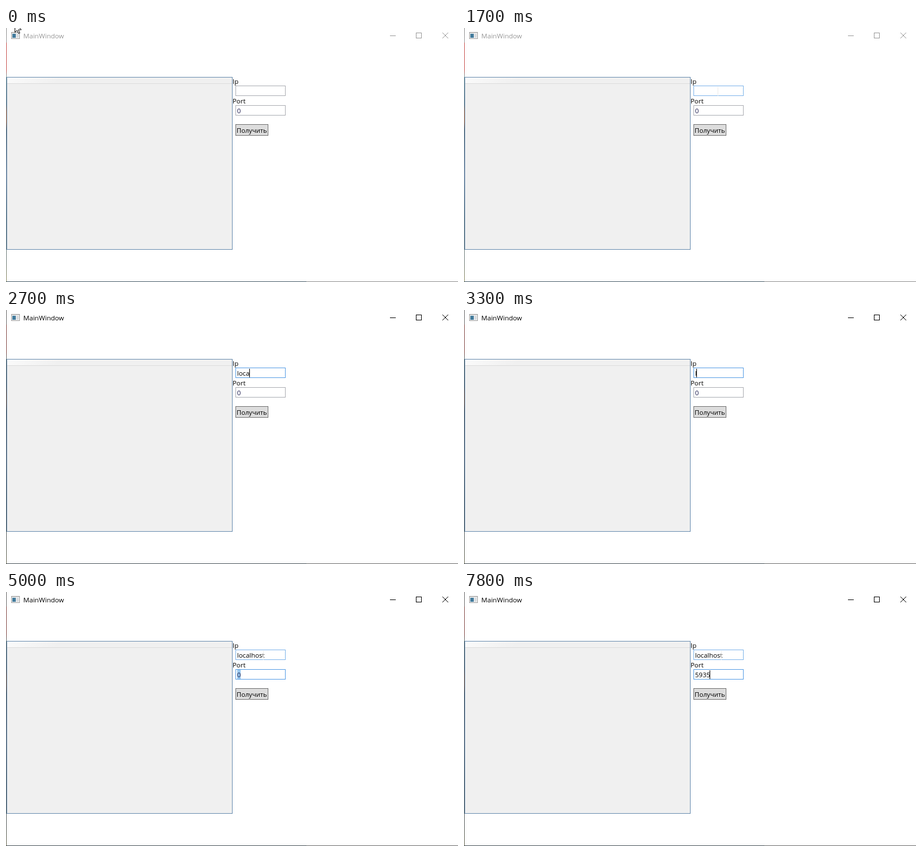
Recreate the animation shown at these times as an HTML page with a canvas. Size 784x441 px, loop 8000 ms.

```html
<!DOCTYPE html>
<html lang="ru">
<head>
<meta charset="utf-8">
<title>MainWindow</title>
<style>
  html, body { margin: 0; width: 100%; height: 100%; overflow: hidden; background: #fff; }
  canvas { display: block; }
</style>
</head>
<body>
<canvas id="stage" width="784" height="441"></canvas>
<script>
const ctx = document.getElementById('stage').getContext('2d');
const LOOP = 8000, CLICK = 1900, TAB = 5000;

// Typing steps: [time, text, caret visible]
const ipSteps = [
  [0, '', 0], [CLICK, '', 1], [2400, 'l', 1], [2600, 'lo', 1], [2700, 'loca', 1],
  [3000, 'loc', 1], [3200, 'lo', 1], [3300, 'l', 1], [3400, 'lo', 1], [3500, 'loc', 1],
  [3600, 'loca', 1], [3700, 'local', 1], [4200, 'local', 0], [4300, 'localh', 0],
  [4400, 'localh', 1], [4500, 'localho', 1], [4700, 'localhos', 1],
  [4900, 'localhost', 1], [TAB, 'localhost', 0]
];
const portSteps = [
  [0, '0', 0], [5900, '5', 1], [6500, '5', 0], [7000, '5', 1],
  [7100, '59', 1], [7400, '593', 1], [7800, '5935', 1]
];
// Pointer steps: [time, shape, x, y]
const pointerSteps = [
  [0, 'arrow', 15, -9], [1400, 'arrow', 238, 19], [1500, 'arrow', 345, 62],
  [1600, 'arrow', 405, 122], [1700, 'beam', 440, 102], [1800, 'beam', 446, 102],
  [2400, 'none', 0, 0], [TAB, 'beam', 446, 102]
];
const arrow = new Path2D('M.5 .5V16.5L4.2 13L6.8 18.5L9 17.5L6.5 12H11.6Z');

const at = (steps, t) => steps.findLast(step => step[0] <= t);

function rect(x, y, w, h, fill) {
  ctx.fillStyle = fill;
  ctx.fillRect(x, y, w, h);
}

function box(x, y, w, h, border, fill) {
  rect(x, y, w, h, border);
  rect(x + 1, y + 1, w - 2, h - 2, fill);
}

function text(str, x, y, color = '#000', size = 11.4) {
  ctx.font = `${size}px "Open Sans", "Noto Sans", sans-serif`;
  ctx.fillStyle = color;
  ctx.fillText(str, x, y);
}

function gradient(x, y, stops) {
  const g = ctx.createLinearGradient(x[0], y[0], x[1], y[1]);
  stops.forEach(([pos, color]) => g.addColorStop(pos, color));
  return g;
}

function drawEdges(active) {
  rect(0, 0, 1, 441, gradient([0, 0], [0, 441], [
    [0, '#8a8a8a'], [.055, '#999'], [.06, '#c8504c'], [.165, '#c8504c'], [.19, '#7f9a98'],
    [.3, '#698088'], [.33, '#c77a48'], [.37, '#c77a48'], [.4, '#56656b'],
    [.58, '#8795a8'], [.75, '#63777c'], [.92, '#6f7b78'], [1, '#8d8a5c']
  ]));
  rect(0, 440, 784, 1, '#8c8c8c');
  rect(0, 440, 521, 1, gradient([0, 0], [521, 0], [
    [0, '#777a56'], [.2, '#36506a'], [.35, '#75644a'], [.55, '#344c62'], [.8, '#405a64'], [1, '#555']
  ]));
  if (active) {
    rect(0, 0, 1, 441, 'rgba(60,60,60,.5)');
    rect(0, 440, 784, 1, 'rgba(70,70,70,.5)');
  }
}

function drawTitleBar(active) {
  const color = active ? '#000' : '#999';
  box(9, 7, 15, 12, '#a0a0a0', '#f4f4f4');
  rect(10, 8, 13, 1, '#d4d4d4');
  rect(11, 10, 6, 7, gradient([11, 10], [17, 17], [[0, '#437b9c'], [1, '#4d9a78']]));
  rect(18, 10, 4, 7, '#d9dde0');
  text('MainWindow', 30, 18, color, 11.6);

  rect(666, 13, 10, 1, color);
  box(711, 8, 10, 10, color, '#fff');
  ctx.strokeStyle = color;
  ctx.lineWidth = 1;
  ctx.beginPath();
  ctx.moveTo(757, 8); ctx.lineTo(767, 18);
  ctx.moveTo(767, 8); ctx.lineTo(757, 18);
  ctx.stroke();
}

function drawField(y, [, value, caret], border, selected) {
  box(398, y, 87, 18, border, '#fff');
  if (selected) rect(401, y + 1, 6, 16, '#99c9ef');
  text(value, 400.85, y + 14, value === '0' ? '#17174a' : '#000');
  if (caret) rect(Math.floor(400.85 + ctx.measureText(value).width + .15 * !value), y + 2, 1, 15, '#000');
}

function drawPointer([, shape, x, y]) {
  if (shape === 'beam') rect(x, y, 1, 16, '#ebebeb');
  if (shape !== 'arrow') return;
  ctx.save();
  ctx.translate(x, y);
  ctx.fillStyle = '#fff';
  ctx.strokeStyle = '#000';
  ctx.fill(arrow);
  ctx.stroke(arrow);
  ctx.restore();
}

function draw(t) {
  const active = t >= CLICK, portFocused = t >= TAB;
  const pointer = at(pointerSteps, t);
  const hovered = pointer[1] === 'beam';
  const ipBorder = active && !portFocused ? '#569de5' : hovered ? '#7eb4ea' : '#abadb3';

  rect(0, 0, 784, 441, '#fff');
  drawEdges(active);
  drawTitleBar(active);

  box(1, 85, 392, 300, '#688caf', '#f0f0f0');
  rect(2, 86, 390, 10, gradient([0, 86], [0, 96], [[0, '#fff'], [.4, '#fdfdfd'], [1, '#f0f0f0']]));
  rect(2, 96, 390, 1, '#dcdcdc');

  text('Ip', 393, 97);
  text('Port', 393, 131);
  drawField(100, at(ipSteps, t), ipBorder);
  drawField(134, at(portSteps, t), portFocused ? '#569de5' : '#abadb3', portFocused && t < 5900);
  box(398, 167, 57, 20, '#707070', '#ddd');
  text('Получить', 400, 182, '#000', 11.2);

  drawPointer(pointer);
}

const start = performance.now();
function tick() {
  draw((performance.now() - start) % LOOP);
  requestAnimationFrame(tick);
}
tick();
</script>
</body>
</html>
```
